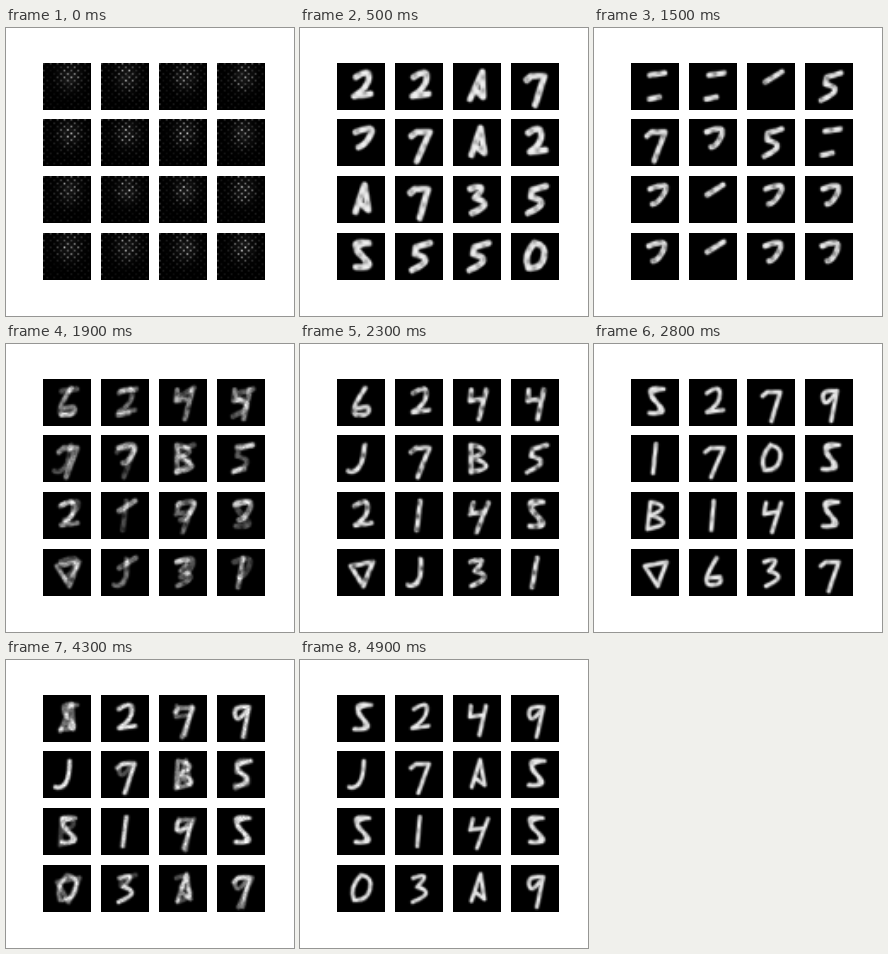
These frames come from a looping animation (288 px wide and 288 px high, 5100 ms). An HTML page with a canvas:

```html
<!DOCTYPE html>
<html lang="en">
<head>
<meta charset="utf-8">
<title>Generated digits</title>
<style>
html, body { margin: 0; width: 100%; height: 100%; overflow: hidden; background: #fff; }
canvas { display: block; width: 288px; height: 288px; }
</style>
</head>
<body>
<canvas id="stage" width="288" height="288"></canvas>
<script>
const N = 28, STEP = 100, LAST = 49, LOOP = 5100;

// Handwritten strokes in a 48 x 47 box; n, t and / are half-formed digits.
const strokes = {
  0: 'M24 10Q12 22 17 35Q30 36 33 24T24 10',
  1: 'M25 9 22 38',
  2: 'M18 14Q31 5 31 15T18 33L34 31',
  3: 'M18 13Q38 6 22 22Q42 27 18 37',
  4: 'M19 11 17 22 29 20M34 11 25 40',
  5: 'M35 10 21 14 20 21Q42 26 17 37',
  6: 'M28 9Q10 36 22 36T31 28L18 29',
  7: 'M16 17 21 13 34 13 23 42',
  8: 'M33 10Q12 12 26 24T18 34Q36 36 24 21T33 10',
  9: 'M32 12Q16 10 18 20T32 12L26 42',
  A: 'M18 36 28 9 31 34 22 27',
  B: 'M17 37 19 10Q42 14 20 23Q46 32 17 37',
  J: 'M27 10Q26 40 12 36',
  V: 'M14 17 36 13 26 37Z',
  n: 'M18 13Q38 5 33 16T22 28',
  t: 'M19 12 34 10M18 36 28 34',
  '/': 'M18 19 34 9'
};

// What the tiles show, row by row, at each stage of training.
const poses = [
  { step: 5, width: 5.4, halo: 0.4, wear: 0.3, rows: '22A7 n7A2 A735 8550' },
  { step: 15, width: 5, halo: 0.2, wear: 0.4, rows: 'tt/5 7n5t n/nn n/nn' },
  { step: 23, width: 4.2, halo: 0.3, wear: 0.6, rows: '6244 J7B5 2148 VJ31' },
  { step: 28, width: 3.6, halo: 0.3, wear: 0.2, rows: '8279 1708 B148 V637' },
  { step: 36, width: 3.9, halo: 0.3, wear: 0.1, rows: 'A279 J9B5 B198 V537' },
  { step: LAST, width: 3.4, halo: 0.3, wear: 0.2, rows: '8249 J7A8 8148 03A9' }
];

const stage = document.getElementById('stage').getContext('2d');
const cell = document.createElement('canvas');
cell.width = cell.height = N;
const pen = cell.getContext('2d', { willReadFrequently: true });

const hash = (a, b, c = 0) => {
  const s = Math.sin(a * 12.9898 + b * 78.233 + c * 37.719) * 43758.5453;
  return s - Math.floor(s);
};
const smooth = u => u * u * (3 - 2 * u);
const field = f => Float32Array.from({ length: N * N }, (_, i) => f(i % N, Math.floor(i / N), i));

// Untrained output: a staggered lattice of dots, brightest above the centre.
function lattice(tile) {
  return field((x, y) => {
    const dot = Math.max(0, Math.cos(x * Math.PI / 2) * Math.cos(y * Math.PI / 2));
    const glow = Math.exp(-((x - 15) ** 2) / 38 - ((y - 8) ** 2) / 60);
    const edge = x === 0 || y === 0 ? 0.14 : 0;
    const grain = 0.35 + 0.65 * hash(x, y, tile * 0.01);
    return (0.12 + 0.75 * glow) * dot * grain + 0.13 * glow * grain + edge * dot;
  });
}

// A stroke drawn at low resolution, slightly leaning and worn away in patches.
function trace(path, pose, tile) {
  const { width, halo, wear, step } = pose;
  pen.setTransform(1, 0, 0, 1, 0, 0);
  pen.globalAlpha = 1;
  pen.fillStyle = '#000';
  pen.fillRect(0, 0, N, N);
  pen.scale(N / 48, N / 47);
  const lean = 0.2 * (hash(tile, step) - 0.5);
  pen.transform(1, 0, lean, 1, -24 * lean, 0);
  pen.strokeStyle = '#fff';
  pen.lineCap = pen.lineJoin = 'round';
  const shape = new Path2D(path);
  for (const [w, alpha] of [[width + 2.2, halo], [width, 0.9]]) {
    pen.lineWidth = w;
    pen.globalAlpha = alpha;
    pen.stroke(shape);
  }
  const { data } = pen.getImageData(0, 0, N, N);
  return field((x, y, i) => {
    const patch = 0.5 + 0.5 * Math.sin(x * 0.9 + tile) * Math.cos(y * 0.8 - tile + step);
    return data[i * 4] / 255 * (1 - wear * patch ** 2);
  });
}

const tiles = [...Array(16).keys()];
const keys = [
  { step: 0, fields: tiles.map(lattice) },
  ...poses.map(pose => {
    const marks = pose.rows.replaceAll(' ', '');
    return { step: pose.step, fields: tiles.map(k => trace(strokes[marks[k]], pose, k)) };
  })
];

const image = pen.createImageData(N, N);

function drawTile(k, step, a, b, u) {
  const swing = u * (1 - u);
  const mix = smooth(Math.min(1, Math.max(0, u + swing * (hash(k, step) - 0.5))));
  const from = a.fields[k], to = b.fields[k];
  for (let i = 0; i < N * N; i++) {
    const v = from[i] * (1 - mix) + to[i] * mix;
    const grain = 1 + swing * (hash(i % N, Math.floor(i / N), step + k) - 0.5);
    image.data.fill(255 * v * grain, i * 4, i * 4 + 3);
    image.data[i * 4 + 3] = 255;
  }
  pen.putImageData(image, 0, 0);
  const x = 37 + 58 * (k % 4);
  const y = Math.floor(35 + 56.67 * Math.floor(k / 4));
  stage.drawImage(cell, x, y, 48, 47);
}

function draw(step) {
  let n = 0;
  while (n < keys.length - 2 && keys[n + 1].step <= step) n++;
  const a = keys[n], b = keys[n + 1];
  const u = (step - a.step) / (b.step - a.step);
  stage.fillStyle = '#fff';
  stage.fillRect(0, 0, 288, 288);
  for (const k of tiles) drawTile(k, step, a, b, u);
}

let shown = -1;
const start = performance.now();
function tick() {
  const t = (performance.now() - start) % LOOP;
  const step = Math.min(LAST, Math.floor(t / STEP));
  if (step !== shown) draw(shown = step);
  requestAnimationFrame(tick);
}
tick();
</script>
</body>
</html>
```
